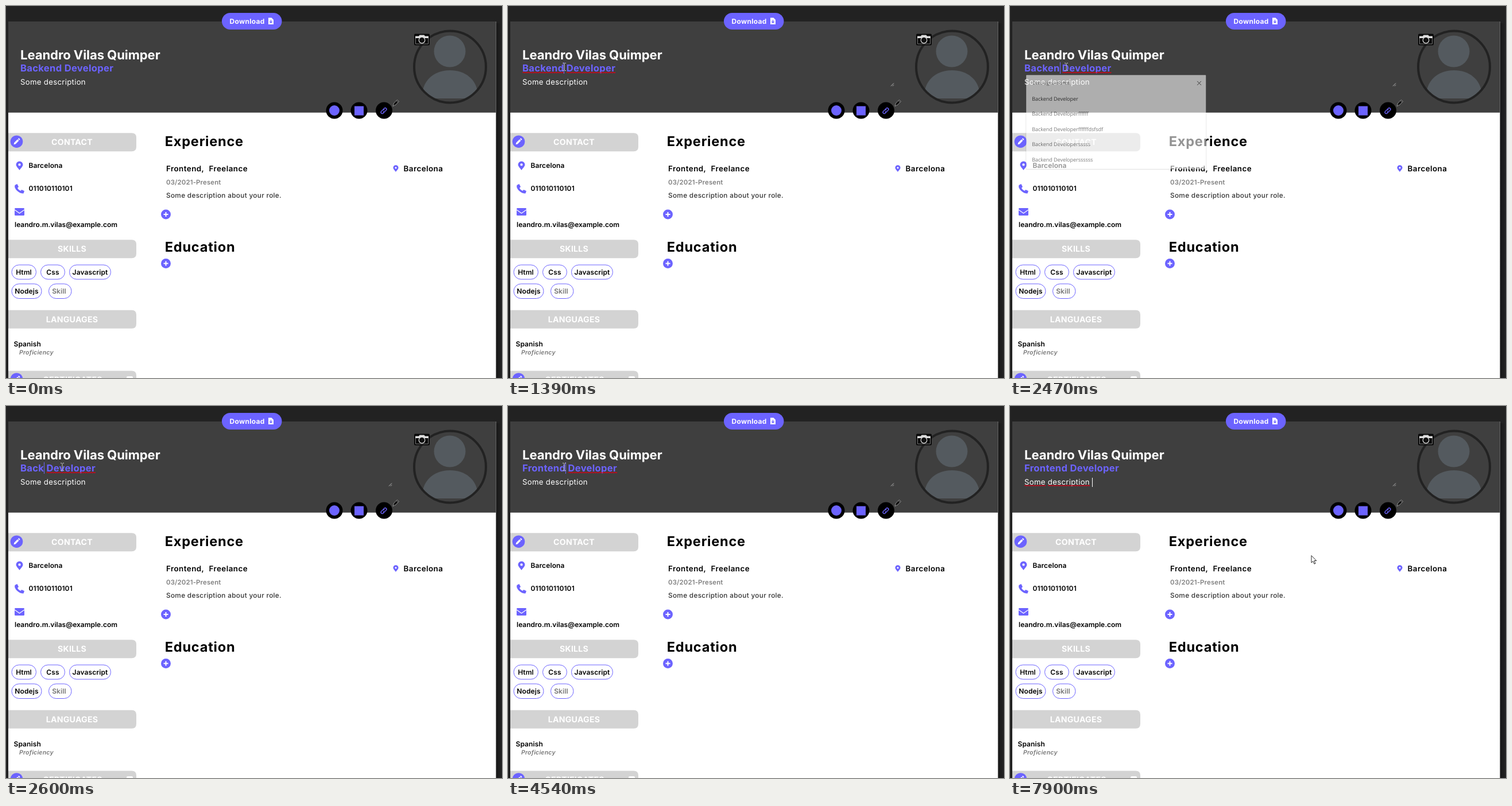
An HTML page for the animation above (8000 ms loop, 864 by 648 pixels).

```html
<!DOCTYPE html>
<html lang="en">
<head>
<meta charset="utf-8">
<title>Resume editor</title>
<style>
  html, body { margin: 0; width: 100%; height: 100%; overflow: hidden; background: #222; }
  svg { display: block; width: 864px; height: 648px; }
  text { font-family: Inter, "Open Sans", sans-serif; white-space: pre; text-rendering: geometricPrecision; }
  .name { font-weight: 700; font-size: 22.1px; letter-spacing: -.1px; fill: #fff; }
  .role { font-weight: 700; font-size: 16.6px; letter-spacing: .3px; fill: #6c63ff; }
  .about { font-size: 13.2px; letter-spacing: .3px; fill: #fff; }
  .button { font-weight: 700; font-size: 12px; letter-spacing: .3px; fill: #fff; }
  .bar { font-weight: 700; font-size: 14.2px; letter-spacing: .2px; fill: #fff; text-anchor: middle; }
  .side { font-weight: 600; font-size: 12px; letter-spacing: .1px; }
  .mid { text-anchor: middle; }
  .level { font-weight: 600; font-style: italic; font-size: 10.5px; letter-spacing: .2px; fill: #777; }
  .head { font-weight: 650; font-size: 23.6px; letter-spacing: .75px; }
  .job { font-weight: 600; font-size: 13.4px; letter-spacing: .45px; }
  .date { font-weight: 600; font-size: 11.4px; letter-spacing: .15px; fill: #808080; }
  .note { font-weight: 500; font-size: 11.8px; letter-spacing: .31px; fill: #333; }
  #popup text { font: 9.3px "Open Sans", "Noto Sans", sans-serif; letter-spacing: -.1px; fill: #222; }
  #popup .title { font-size: 8.6px; fill: #666; }
  .pill { fill: #fff; stroke: #6c63ff; }
  .accent { fill: #6c63ff; }
</style>
</head>
<body>
<svg viewBox="0 0 864 648" xmlns="http://www.w3.org/2000/svg">
  <defs>
    <linearGradient id="edge">
      <stop offset="0" stop-color="#171717"/><stop offset="1" stop-color="#222"/>
    </linearGradient>
    <clipPath id="ring"><circle cx="773.5" cy="106" r="60.5"/></clipPath>
    <g id="pin">
      <path class="accent" d="M0 8C-1.6 5.2-6 1.4-6-1.6A6 6 0 0 1 6-1.6C6 1.4 1.6 5.2 0 8Z"/>
      <circle cy="-1.6" r="2.1" fill="#fff"/>
    </g>
    <g id="plus">
      <circle class="accent" r="8.5"/>
      <path d="M-4 0H4M0-4V4" stroke="#fff" stroke-width="2"/>
    </g>
    <g id="edit">
      <circle class="accent" r="10.8"/>
      <path d="M-5 5L-4.2 1.8 1.6-4 4-1.6-1.8 4.2ZM2.4-4.8L3.3-5.6Q4-6 4.6-5.4L5.4-4.6Q6-4 5.6-3.3L4.8-2.4Z" fill="#fff"/>
    </g>
    <path id="bar" d="M4 0H219Q227 0 227 8V24Q227 32 219 32H4Z" fill="#d3d3d3"/>
  </defs>

  <rect width="864" height="648" fill="#222"/>
  <rect x="853" y="30" width="9" height="618" fill="url(#edge)"/>
  <rect x="4" y="27" width="849.5" height="621" fill="#fff"/>
  <rect x="4" y="27" width="849.5" height="158.7" fill="#3f3f3f"/>

  <rect class="accent" x="376" y="12" width="104.500" height="29" rx="14.5"/>
  <text class="button" x="389.5" y="31">Download</text>
  <path d="M457 20.5H462.5L466 24V32H457Z" fill="#fff"/>
  <path d="M461.5 24V29M459.3 27L461.5 29.4 463.7 27" fill="none" stroke="#6c63ff" stroke-width="1.3"/>

  <circle cx="773.5" cy="106" r="62.5" fill="none" stroke="#222" stroke-width="4"/>
  <g clip-path="url(#ring)" fill="#545a5f">
    <circle cx="773" cy="79" r="27.5"/>
    <path d="M725 161V154C727 127 748 112 773.5 112S820 127 822 154V161Z"/>
  </g>

  <rect x="711" y="48.5" width="27" height="20" rx="2" fill="#080808"/>
  <path d="M713 56V52.500H719L720.500 50.500H728.500L730 52.500H736V56Z" fill="#ddd"/>
  <path d="M713.500 56V66H735.500V56" fill="none" stroke="#999" stroke-width=".8"/>
  <circle cx="724.5" cy="59.5" r="5.3" fill="#111" stroke="#ddd" stroke-width="1.2"/>

  <g>
    <circle cx="572" cy="182" r="14.5"/><circle cx="615" cy="182" r="14.5"/><circle cx="658.5" cy="182" r="14.5"/>
    <circle class="accent" cx="572" cy="182" r="9"/>
    <rect class="accent" x="607" y="174.5" width="16" height="16"/>
    <g transform="translate(658 182.5) rotate(-45) scale(.9)" fill="none" stroke="#6c63ff" stroke-width="1.5">
      <path d="M-1 2.600H-4A2.600 2.600 0 0 1-4-2.600H-.5A2.600 2.600 0 0 1 2 0M1-2.600H4A2.600 2.600 0 0 1 4 2.600H.5A2.600 2.600 0 0 1-2 0"/>
    </g>
  </g>
  <path d="M674 174.5L675.5 169.5 681 163.5 684.5 166 679 172Z" fill="#111" stroke="#bbb" stroke-width=".7"/>
  <path d="M680 165L683 167.5" stroke="#bbb" stroke-width=".7"/>

  <use href="#bar" y="221.3"/><use href="#bar" y="407.3"/><use href="#bar" y="529.8"/><use href="#bar" y="635.5"/>
  <text class="bar" x="115" y="242">CONTACT</text>
  <text class="bar" x="115" y="428">SKILLS</text>
  <text class="bar" x="115" y="550.5">LANGUAGES</text>
  <text class="bar" x="116" y="655.5">CERTIFICATES</text>
  <use href="#edit" x="18.5" y="236.2"/><use href="#edit" x="18.5" y="650"/>
  <rect x="210" y="645" width="11" height="10" rx="2" fill="#fff"/>

  <use href="#pin" x="23.5" y="278"/>
  <text class="side" x="39.5" y="282.3">Barcelona</text>
  <path class="accent" d="M15.5 312L19.500 310 22 315 20 317Q21.500 320.500 25.500 322L27.300 320 32 322.300 30.500 326.500Q25 327 19.500 322T15.500 312Z"/>
  <text class="side" x="39.5" y="322">011010110101</text>
  <rect class="accent" x="15" y="352" width="17" height="13" rx="1.5"/>
  <path d="M15 355L23.5 361 32 355" fill="none" stroke="#fff" stroke-width="1.2"/>
  <text class="side" x="15" y="385" style="letter-spacing:0">leandro.m.vilas@example.com</text>

  <g class="pill">
    <rect x="10" y="451" width="42.5" height="25" rx="12.5"/>
    <rect x="60.5" y="451" width="42" height="25" rx="12.5"/>
    <rect x="110.5" y="451" width="72" height="25" rx="12.5"/>
    <rect x="10" y="484" width="52" height="25.5" rx="12.7"/>
    <rect x="74.5" y="484" width="39.5" height="25.5" rx="12.7"/>
  </g>
  <g class="side mid">
    <text x="31" y="467.5">Html</text>
    <text x="81.5" y="467.5">Css</text>
    <text x="146.5" y="467.5">Javascript</text>
    <text x="36" y="500.5">Nodejs</text>
    <text x="92.5" y="500.5" fill="#757575">Skill</text>
  </g>
  <text class="side" x="13.5" y="593">Spanish</text>
  <text class="level" x="23" y="607.3">Proficiency</text>

  <text class="head" x="276.7" y="244">Experience</text>
  <text class="job" x="279" y="288">Frontend,</text>
  <text class="job" x="353.5" y="288">Freelance</text>
  <use href="#pin" transform="translate(679 283) scale(.76)"/>
  <text class="job" x="692.5" y="288">Barcelona</text>
  <text class="date" x="279" y="311">03/2021-Present</text>
  <text class="note" x="279" y="334">Some description about your role.</text>
  <use href="#plus" x="278.5" y="363"/>
  <text class="head" x="276.7" y="428">Education</text>
  <use href="#plus" x="278.5" y="448.5"/>

  <rect id="hover" x="18" y="65" width="257" height="83" rx="6" fill="#282828"/>
  <text class="name" x="25" y="93">Leandro Vilas Quimper</text>
  <text class="role" id="role" x="25" y="113.7" xml:space="preserve"></text>
  <text class="about" id="about" x="25" y="137.3" xml:space="preserve"></text>
  <path id="wave" fill="none" stroke="#e00018" stroke-width="1.2"/>
  <rect id="caret" width="1"/>
  <path id="grip" d="M667 139.5L672 134.500M670 139.500L672 137.500" stroke="#bbb"/>

  <g id="popup">
    <rect x="24" y="118" width="321.5" height="169" rx="2" fill="#000" opacity=".16"/>
    <rect x="25" y="118.5" width="319.5" height="167" rx="1" fill="#fff"/>
    <text class="title" x="36.5" y="136">Datos guardados</text>
    <path d="M329 129.5L336 136.500M336 129.500L329 136.500" stroke="#333"/>
    <text x="35.3" y="164">Backend Developer</text>
    <text x="35.3" y="191">Backend Developerffffff</text>
    <text x="35.3" y="218">Backend Developerffffffdsfsdf</text>
    <text x="35.3" y="245.3">Backend Developersssss</text>
    <text x="35.3" y="272.3">Backend Developerssssss</text>
  </g>

  <path id="beam" d="M-3-6.500H-1L0-5.500 1-6.500H3M0-5.500V5.500M-3 6.500H-1L0 5.500 1 6.500H3" fill="none" stroke="#c4c4c4"/>
  <path id="arrow" d="M0 0V12.500L2.900 9.800 5 14.700 7 13.800 4.900 9H8.800Z" fill="#fff" stroke="#111" stroke-width=".9"/>
</svg>
<script>
const LOOP = 8000, STEP = 66, LEFT = 25;
const $ = id => document.getElementById(id);
const role = $("role"), about = $("about"), caret = $("caret");

const words = [[0, "Backend"], [2400, "Backen"], [2540, "Backe"], [2600, "Back"], [2670, "Bac"],
  [2740, "Ba"], [2800, "B"], [3000, ""], [3670, "F"], [3940, "Fr"], [4010, "Fro"],
  [4200, "Front"], [4400, "Fronte"], [4470, "Fronten"], [4540, "Frontend"]];
const focus = [[0, ""], [1390, "role"], [5690, "about"]];
const hover = [[0, 0], [860, .4], [930, .8], [1000, 1], [1390, 0]];
const popup = [[0, 0], [1590, .55], [1660, 1], [2470, .58], [2540, .2], [2600, 0]];
// Times at which the caret switches on and off in turn
const blinks = [1390, 1590, 1800, 2000, 2200, 3400, 3600, 4740, 5000, 6840, 7100, 7300, 7500, 7700, 7900];
const path = [[70, 380, 634], [330, 310, 380], [600, 190, 215], [860, 110, 125], [1000, 87, 106],
  [1200, 98, 106], [5150, 98, 106], [5350, 170, 140], [5500, 290, 162], [5600, 313, 162],
  [5750, 274.5, 132.5], [6030, 274.5, 132.5], [6300, 400, 180], [6690, 525, 260.5]];

const at = (table, t) => table.findLast(row => row[0] <= t)[1];

function pointer(t) {
  const i = path.findLastIndex(p => p[0] <= t);
  if (i < 0) return null;
  const [t0, x, y] = path[i], next = path[i + 1];
  if (!next) return [x, y];
  const held = t0 + Math.floor((t - t0) / STEP) * STEP;
  const k = (held - t0) / (next[0] - t0);
  return [x + (next[1] - x) * k, y + (next[2] - y) * k];
}

function setText(el, s) {
  if (el.textContent !== s) el.textContent = s;
}

const widthTo = (el, n) => n ? el.getSubStringLength(0, n) : 0;

function squiggle(el, from, to, y) {
  const end = LEFT + widthTo(el, to);
  let x = LEFT + widthTo(el, from), d = `M${x} ${y}`;
  for (let up = 1; x < end; up = -up) {
    x = Math.min(x + 2, end);
    d += `L${x} ${y - up * .6}`;
  }
  return d;
}

function place(el, p, shown) {
  el.style.display = shown ? "" : "none";
  if (shown) el.setAttribute("transform", `translate(${p})`);
}

function draw(t) {
  const word = at(words, t), field = at(focus, t), onRole = field === "role";
  setText(role, word + " Developer");
  setText(about, "Some description" + (t >= 7100 ? " " : ""));

  $("hover").style.opacity = at(hover, t);
  $("grip").style.display = field ? "" : "none";

  let d = "";
  if (onRole) {
    const n = word.length;
    if (t < 2400) d += squiggle(role, 0, n, 116);
    d += squiggle(role, n + 1, n + 10, 116);
  } else if (field) {
    d = squiggle(about, 0, 4, 138.7) + squiggle(about, 5, 16, 138.7);
  }
  $("wave").setAttribute("d", d);

  const on = blinks.filter(b => b <= t).length % 2;
  caret.style.display = on ? "" : "none";
  if (on) {
    const el = onRole ? role : about;
    const n = onRole ? word.length : about.textContent.length;
    caret.setAttribute("x", Math.round(LEFT + widthTo(el, n)));
    caret.setAttribute("y", onRole ? 98 : 125);
    caret.setAttribute("height", onRole ? 20 : 16);
    caret.setAttribute("fill", onRole ? "#6c63ff" : "#fff");
  }

  const alpha = at(popup, t), size = alpha < 1 ? .98 : 1;
  $("popup").style.opacity = alpha;
  $("popup").setAttribute("transform", `translate(184.7 202) scale(${size}) translate(-184.7 -202)`);

  const p = pointer(t);
  const typing = p && p[1] < 145 && p[0] < 675;
  place($("beam"), p, p && typing);
  place($("arrow"), p, p && !typing);
}

const start = performance.now();
function tick() {
  draw((performance.now() - start) % LOOP);
  requestAnimationFrame(tick);
}
tick();
</script>
</body>
</html>
```
